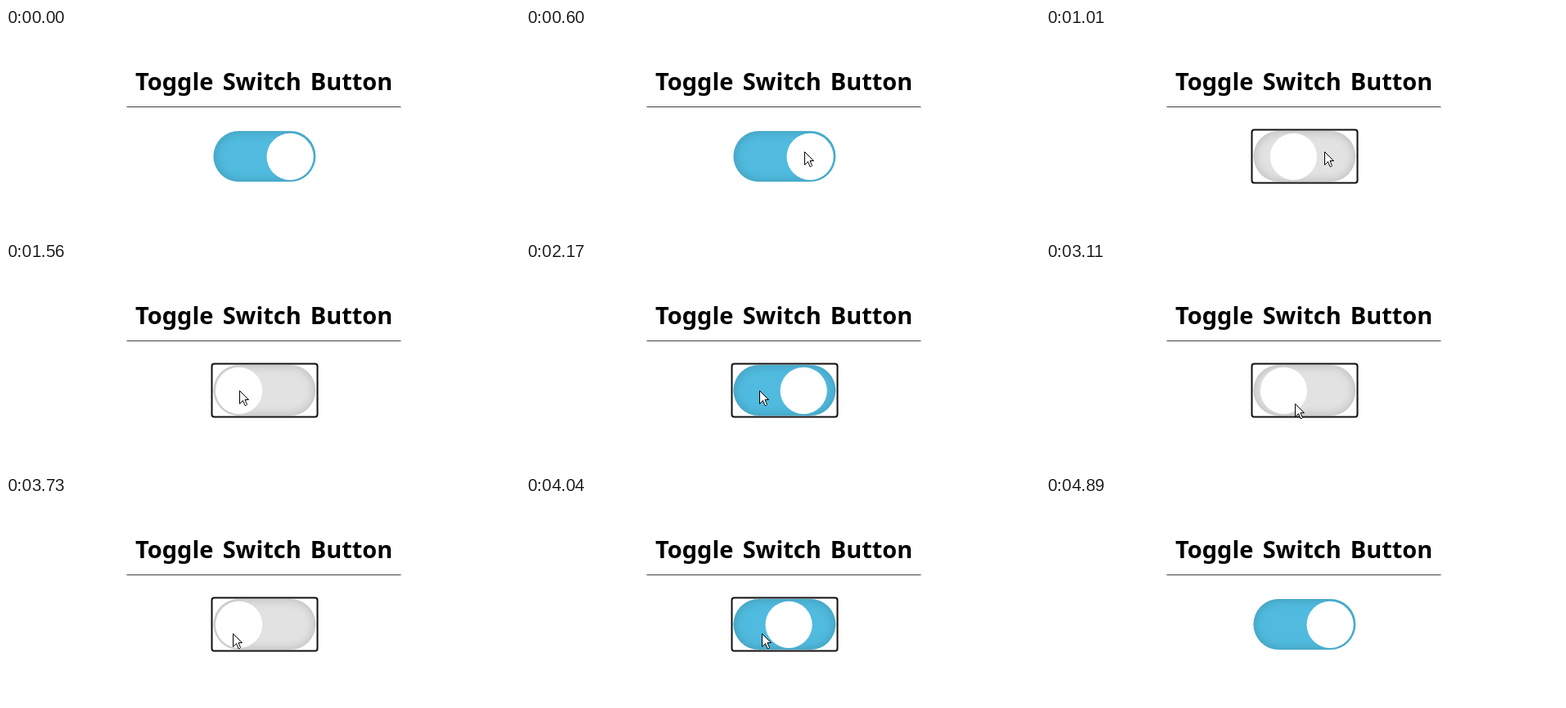
An HTML page for the animation above (4.97 s loop, 628 px wide and 252 px high).

```html
<!DOCTYPE html>
<html lang="en">
<head>
<meta charset="utf-8">
<title>Toggle Switch Button</title>
<style>
  html, body { margin: 0; width: 100%; height: 100%; overflow: hidden; background: #fff; }
  svg { position: absolute; left: 0; top: 0; }
  text { font: 600 29px "Noto Sans", "Open Sans", sans-serif; text-anchor: middle; }
  #track {
    position: absolute; left: 0; top: 0; width: 125px; height: 62px;
    transform: translate(253.4px, 126px);
    border-radius: 31px; background: #e2e2e2;
    box-shadow: inset 0 0 12.5px rgba(0, 0, 0, .2);
  }
  #track.on { background: #50bbdf; }
</style>
</head>
<body>
<div id="track" class="on"></div>
<svg width="628" height="252" viewBox="0 0 628 252">
  <text y="76"><tspan x="209.5">Toggle</tspan> <tspan x="316.5">Switch</tspan> <tspan x="422">Button</tspan></text>
  <rect x="147.5" y="96" width="335" height="1" fill="#404040"/>
  <circle id="knob" cy="157.4" r="28.6" fill="#fff"/>
  <rect id="ring" x="251.5" y="124.5" width="129" height="65" rx="3" fill="none" stroke="#101010" stroke-width="2"/>
  <path id="pointer" d="M.5 .5V16.5L4.5 12.5 7 18.5H8.5L9.5 17.5 7 11.5H11.5Z" fill="#fff" stroke="#000"/>
</svg>
<script>
const LOOP = 4970, STEP = LOOP / 64, LEAD = 10;
const SLIDE = 400, OFF_X = 284.6, TRAVEL = 62.5;

// Switch flips: off, on, off, on
const clicks = [840, 1941, 2853, 3903];
// Pointer stops: time, x, y
const stops = [
  [70, 452, 243], [300, 358, 207], [520, 340, 151], [1000, 340, 151],
  [1480, 285, 157], [2180, 285, 157], [2570, 345, 167],
  [2870, 304, 173], [3110, 304, 173], [3180, 251, 176],
  [3500, 257, 169], [3880, 288, 168], [4040, 288, 168], [4260, 445, 216]
];

const [track, knob, ring, pointer] =
  ["track", "knob", "ring", "pointer"].map(id => document.getElementById(id));

// cubic-bezier(.25, .1, .25, 1), solved by bisection
function ease(p) {
  if (p >= 1) return 1;
  let lo = 0, hi = 1;
  for (let i = 0; i < 20; i++) {
    const s = (lo + hi) / 2;
    if (.75 * s * (1 - s) + s ** 3 < p) lo = s; else hi = s;
  }
  return .3 * lo * (1 - lo) ** 2 + 3 * lo * lo * (1 - lo) + lo ** 3;
}

const smooth = k => k * k * (3 - 2 * k);

function pointAt(t) {
  const i = stops.findIndex(s => s[0] >= t);
  if (i < 0) return stops[stops.length - 1].slice(1);
  const [t0, x0, y0] = stops[Math.max(i - 1, 0)], [t1, x1, y1] = stops[i];
  const k = t1 > t0 ? smooth((t - t0) / (t1 - t0)) : 1;
  return [Math.round(x0 + (x1 - x0) * k), Math.round(y0 + (y1 - y0) * k)];
}

const show = (el, on) => el.setAttribute("visibility", on ? "visible" : "hidden");

function draw(time) {
  // The picture advances in even steps
  const t = Math.floor((time + LEAD) / STEP) % 64 * STEP;
  const done = clicks.filter(c => c <= t);
  const on = done.length % 2 === 0;
  const p = done.length ? ease((t - done[done.length - 1]) / SLIDE) : 1;
  track.className = on ? "on" : "";
  knob.setAttribute("cx", OFF_X + TRAVEL * (on ? p : 1 - p));
  show(ring, t >= 690 && t < 4890);
  show(pointer, t >= 70 && t < 4340);
  pointer.setAttribute("transform", `translate(${pointAt(t)})`);
}

const start = performance.now();
function loop() {
  draw((performance.now() - start) % LOOP);
  requestAnimationFrame(loop);
}
loop();
</script>
</body>
</html>
```
